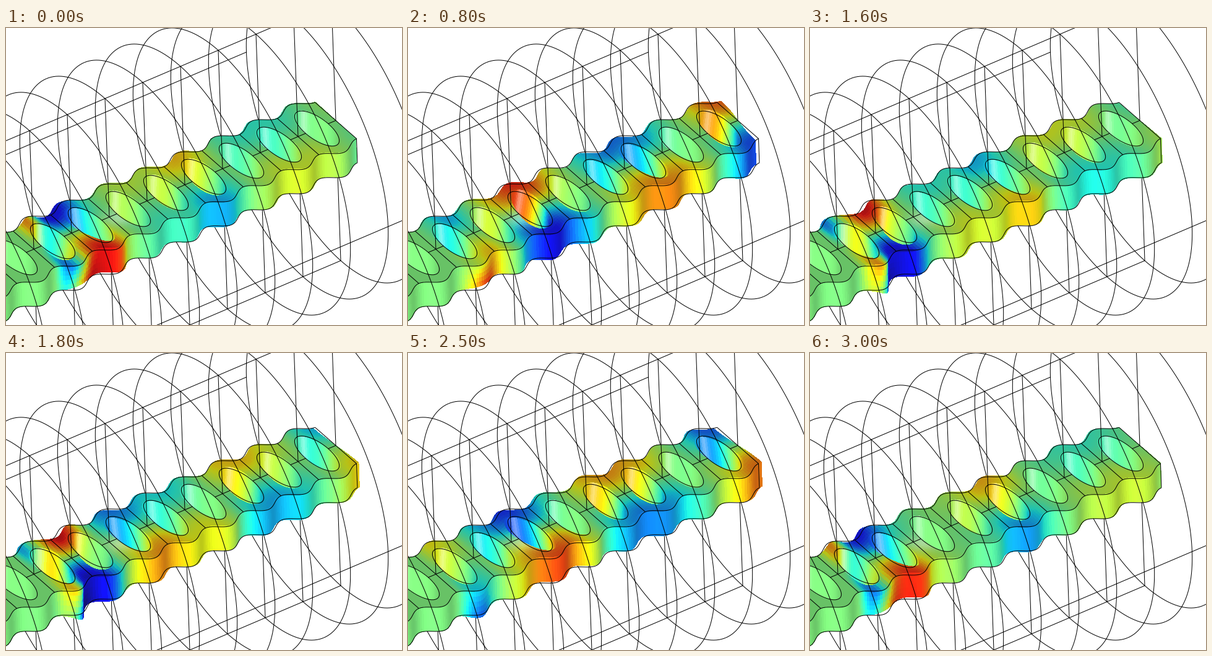
A matplotlib script for the animation above (3.1 s loop, 640x480 px).

```python
import numpy as np
import matplotlib.pyplot as plt
from matplotlib.animation import FuncAnimation
from matplotlib.collections import LineCollection, PolyCollection

FRAMES, INTERVAL = 31, 100
CELLS = 11

# Screen vectors of the orthographic view (y points down)
AXIS = np.array([61.0, -26.0])      # one cell along the beam
SIDE = np.array([33.5, 29.3])       # half width of the beam at a neck
DROP = np.array([1.4, 39.0])        # beam thickness
TOP = np.array([533.0, 149.5])      # middle of the top face at the far end
RADIUS_W = np.array([145.0, 128.0])  # cylinder radius, sideways
RADIUS_Z = np.array([-7.5, -209.0])  # cylinder radius, upwards
CENTRE = np.array([533.5, 167.0])

HOLE_W, HOLE_N = 0.93, 0.30
FAR = np.radians(120.7)             # middle of the visible hole wall

# Complex wave amplitude on the front side, by distance in cells from the end
KNOT_N = np.array([0, .3, .8, 1.5, 2.6, 3.6, 4.5, 5.5,
                   6.1, 6.65, 7.1, 7.65, 8.05, 8.6, 12])
KNOT_U = np.array([-.06 + .62j, .02 + .6j, .15 + .22j, .22 - .18j, .1 - .54j,
                   -.4 - .25j, -.18 + .27j, -.12 + .78j, .15 + .42j,
                   .78 - .1j, .7 - .42j, -.52 - .12j, 0, 0, 0])


def hermite(x, xp, yp):
    slope = np.gradient(yp, xp)
    slope[-3:] = 0
    i = np.clip(np.searchsorted(xp, x) - 1, 0, len(xp) - 2)
    d = xp[i + 1] - xp[i]
    t = (x - xp[i]) / d
    return ((1 + 2 * t) * (1 - t) ** 2 * yp[i] + t * (1 - t) ** 2 * d * slope[i]
            + t * t * (3 - 2 * t) * yp[i + 1] + t * t * (t - 1) * d * slope[i + 1])


GRID = np.linspace(0, CELLS, 1101)
WAVE = hermite(GRID, KNOT_N, KNOT_U)
SWAY = -2.0 * np.cumsum(WAVE[::-1])[::-1] * (GRID[1] - GRID[0])


def at(table, n):
    return np.interp(n, GRID, table.real) + 1j * np.interp(n, GRID, table.imag)


def width(n):
    return 1 + 0.31 * (1 - np.cos(2 * np.pi * n)) / 2


def rest(n, w, z):
    n, w, z = (np.asarray(a, float)[..., None] for a in (n, w, z))
    return TOP - n * AXIS + w * SIDE + z * DROP


class Patch:
    """A grid of surface points with the complex field on it."""

    def __init__(self, n, w, z, lit, glow=0.0):
        n, w, z = np.broadcast_arrays(n, w, z)
        self.rest = rest(n, w, z)
        q = np.clip(w / width(n), -1, 1)
        near = np.exp(-((n - 7.45) / 0.32) ** 2) * z * np.clip(q, 0, 1)
        near = near * (0.55 - 0.5j)
        along = at(WAVE, n) * np.sin(np.pi / 2 * q)
        self.field = along + near
        axial = AXIS / np.hypot(*AXIS)
        across = SIDE / np.hypot(*SIDE)
        self.shift = (10 * along[..., None] * axial
                      + at(SWAY, n)[..., None] * across
                      + near[..., None] * np.array([0, -14.0]))
        self.lit = np.broadcast_to(lit, n.shape)
        self.glow = np.broadcast_to(glow, n.shape)

    def quads(self, turn):
        p = self.rest + (self.shift * turn).real
        quad = np.stack([p[:-1, :-1], p[1:, :-1], p[1:, 1:], p[:-1, 1:]], axis=2)
        return quad.reshape(-1, 4, 2)

    def colours(self, turn):
        def mid(a):
            return ((a[:-1, :-1] + a[1:, :-1] + a[1:, 1:] + a[:-1, 1:]) / 4).ravel()
        value = mid((self.field * turn).real)
        rgb = plt.get_cmap("jet")(0.5 + 0.5 * np.clip(value, -1, 1))[:, :3]
        rgb = rgb * mid(self.lit)[:, None] + 0.07
        glow = mid(self.glow)[:, None]
        return np.clip(rgb * (1 - glow) + glow, 0, 1)


def top_face():
    n = np.linspace(0, CELLS, CELLS * 16 + 1)[:, None]
    q = np.linspace(-1, 1, 25)[None, :]
    glow = 0.4 * np.exp(-((n - 5.85) / 0.3) ** 2 - ((q - 0.2) / 0.35) ** 2)
    return Patch(n, q * width(n), 0.0, 0.69, glow)


def front_wall():
    n = np.linspace(0, CELLS, CELLS * 20 + 1)[:, None]
    z = np.linspace(0, 1, 6)[None, :]
    return Patch(n, width(n), z, 0.84 - 0.13 * np.sin(2 * np.pi * n))


def hole_wall(mid):
    # Each strip runs from the far rim straight down to the near rim
    a = np.linspace(np.pi / 2, -np.pi / 2, 31)[:, None]
    angle = np.hstack([FAR + a, FAR + np.pi - a])
    lit = 0.95 - 0.22 * np.abs(np.sin(a)) ** 3
    glow = 0.45 * np.exp(-((a - 0.6) / 0.2) ** 2)
    patch = Patch(mid - HOLE_N * np.sin(angle), HOLE_W * np.cos(angle),
                  0.0, lit, glow)
    patch.field[:, 1] = patch.field[:, 0]
    return patch


def beam_edges():
    n = np.linspace(0, CELLS, CELLS * 20 + 1)
    h = width(n)
    lines = [rest(n, -h, 0 * n), rest(n, h, 0 * n), rest(n, h, 0 * n + 1)]
    lines.append(rest([0, 0], [1, 1], [0, 1]))
    t = np.linspace(0, 2 * np.pi, 61)
    for k in range(CELLS):
        lines.append(rest([k, k], [-1, 1], [0, 0]))
        lines.append(rest(k + 0.5 - HOLE_N * np.sin(t), HOLE_W * np.cos(t), 0 * t))
        for lo, hi in ((k, k + 0.5 - HOLE_N), (k + 0.5 + HOLE_N, k + 1)):
            lines.append(rest([lo, hi], [0, 0], [0, 0]))
    return lines


def cylinder_edges():
    behind, ahead = [], []
    t = np.linspace(0, np.pi, 91)[:, None]
    split = np.radians(-48.3)
    for k in range(13):
        c = CENTRE - k * AXIS
        for start, group in ((split, ahead), (split + np.pi, behind)):
            group.append(c + np.cos(start + t) * RADIUS_W
                         + np.sin(start + t) * RADIUS_Z)
        ahead.append(np.array([c + RADIUS_Z, TOP - k * AXIS]))
        behind.append(np.array([c - RADIUS_Z, TOP + DROP - k * AXIS]))
    for offset in (RADIUS_W, -RADIUS_W, RADIUS_Z, -RADIUS_Z):
        behind.append(np.array([CENTRE + offset, CENTRE + offset - 14 * AXIS]))
    return behind, ahead


fig = plt.figure(figsize=(6.4, 4.8), dpi=100, facecolor="white")
ax = fig.add_axes([0, 0, 1, 1])
ax.set_xlim(0, 640)
ax.set_ylim(480, 0)
ax.axis("off")


def add_lines(lines, order):
    ax.add_collection(LineCollection(lines, colors="black", linewidths=0.72,
                                     zorder=order), autolim=False)


back_lines, front_lines = cylinder_edges()
add_lines(back_lines, 1)
add_lines(beam_edges() + front_lines, 3)

patches = [top_face(), front_wall()] + [hole_wall(k + 0.5) for k in range(CELLS)]
surface = PolyCollection([], edgecolors="none", antialiaseds=False, zorder=2)
ax.add_collection(surface, autolim=False)


def update(i):
    turn = np.exp(2j * np.pi * i / FRAMES)
    surface.set_verts(np.concatenate([p.quads(turn) for p in patches]))
    surface.set_facecolor(np.concatenate([p.colours(turn) for p in patches]))
    return [surface]


anim = FuncAnimation(fig, update, frames=FRAMES, interval=INTERVAL,
                     init_func=lambda: update(0), repeat=True, repeat_delay=0,
                     blit=False)
plt.show()
```
